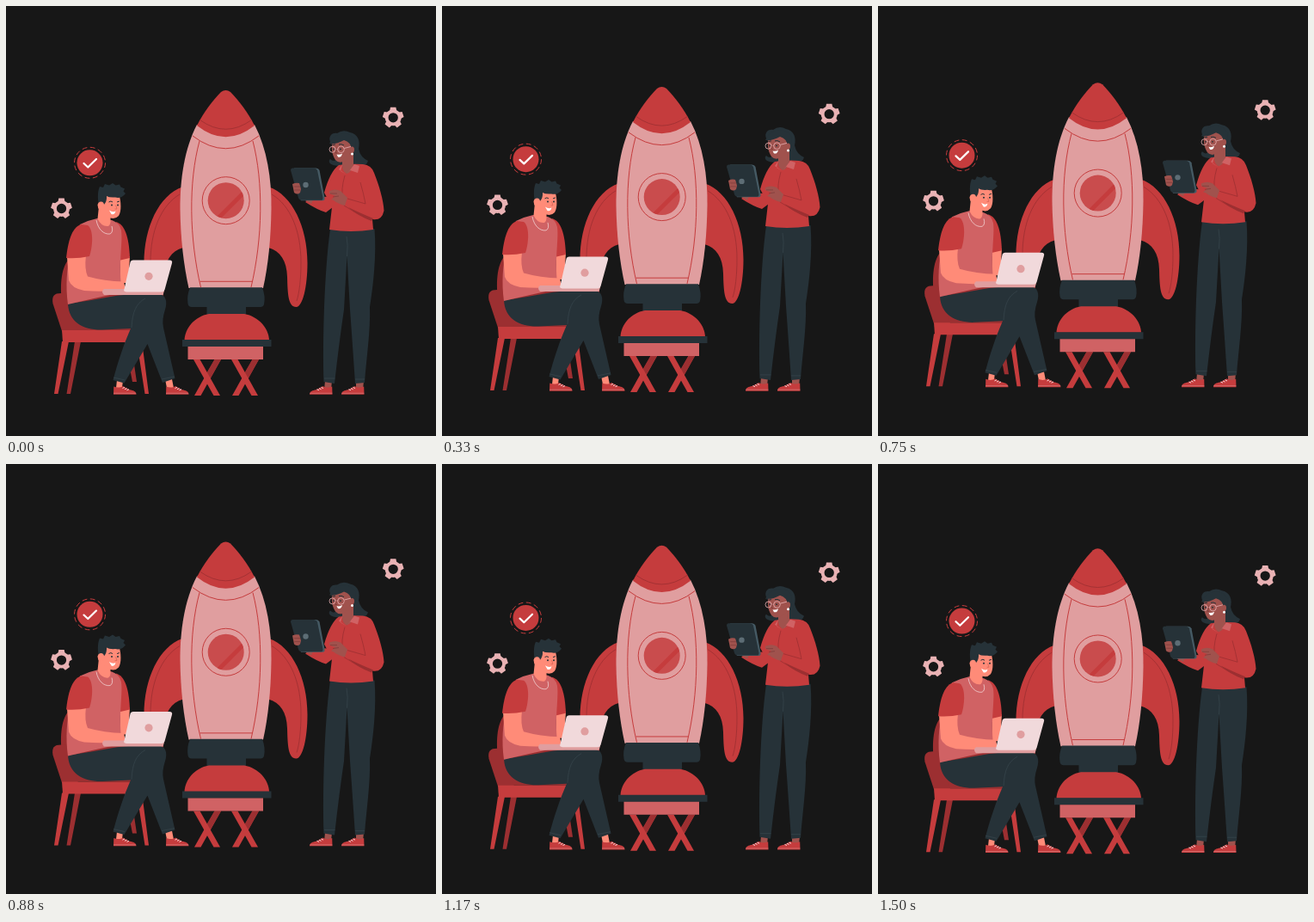
An HTML page that plays this animation: 500x500 px, repeating every 1.54 s.

```html
<!DOCTYPE html>
<html lang="en">
<head>
<meta charset="utf-8">
<title>Rocket team</title>
<style>
  html, body { margin: 0; width: 100%; height: 100%; overflow: hidden; background: #171717; }
  svg { display: block; width: 100%; height: 100%; }
  .red { fill: #c53c3d; }
  .deep { fill: #9c2f31; }
  .rose { fill: #d06264; }
  .pink { fill: #e09e9f; }
  .pale { fill: #f1d9db; }
  .gear { fill: #e9b2b4; }
  .dark { fill: #263238; }
  .skin { fill: #ff8b78; }
  .brown { fill: #a0524d; }
  .white { fill: #fff; }
  .line { fill: none; stroke: #c53c3d; stroke-width: 1; }
  .fold { fill: none; stroke: #9c2f31; stroke-width: .8; }
  .thin { fill: none; stroke: #fff; stroke-width: .8; }
</style>
</head>
<body>
<svg viewBox="0 0 500 500">
  <defs>
    <g id="fin">
      <path class="red" d="M306 210.500C333 220 350.500 257 350.500 299C350.500 326 345 350 337.500 350C328 350 327.500 334 327 315C326.500 296 319 285 305 281Z"/>
      <path class="fold" d="M309 219C331 232 343 262 343 298C343 318 341 334 338 343"/>
    </g>
    <g id="trestle">
      <path class="red" d="M242.500 411H250L226.500 453H219Z"/>
      <path class="deep" d="M242.500 411H250L238 432.500L232.500 428Z"/>
      <path class="red" d="M218 411H225.500L249 453H241.500Z"/>
    </g>
    <g id="shoe">
      <path class="red" d="M.3 1.500C4 3 8 3 11 1L19 5.200C23 6 26.500 7 26.500 10.800H0Z"/>
      <path class="thin" d="M0 9.300H26.300" stroke-opacity=".3"/>
      <path class="thin" d="M10.500 3.600L13 2.300M13 4.800L15.500 3.500M15.500 5.800L18 4.700"/>
    </g>
    <g id="gear">
      <circle r="7.600" fill="none" stroke="#e9b2b4" stroke-width="3.900"/>
      <g id="teeth" class="gear"></g>
    </g>
    <clipPath id="glass"><circle cx="255.700" cy="226.200" r="21"/></clipPath>
  </defs>

  <g id="scene">
    <!-- rocket -->
    <use href="#fin"/>
    <use href="#fin" transform="matrix(-1 0 0 1 511 0)"/>
    <path class="pink" d="M222 138C207.500 166 202.300 201 202.500 236C203 270 206.500 301 212.500 328H299C305 301 308 270 308.500 236C309 201 303.500 166 289 138Z"/>
    <path class="red" d="M222 139C230 123.500 240 110 250 100Q255.500 96 261 100C271 110 281 123.500 289 139Q255.500 165.500 222 139Z"/>
    <path class="fold" d="M225.500 132.500Q255.500 154 285.500 132.500"/>
    <path class="line" d="M217 151Q255.500 180.500 294 151M225 157C212 205 213 270 226.500 327M287 157C299.500 205 298.500 270 285 327M225.500 320.300H286.500"/>
    <circle class="line" cx="255.700" cy="226.200" r="27.500"/>
    <circle cx="255.700" cy="226.200" r="21" fill="#c94c4d"/>
    <path class="red" clip-path="url(#glass)" d="M242 248L280 210L283 214L246 251Z"/>
    <path class="dark" d="M214 327.300H298Q302 338 300 347Q299 350 296 350H216Q212 350 211.500 346Q210 337 214 327.300ZM233.500 349H279V359H233.500Z"/>
    <path class="red" d="M207.500 388.500C208 375 219 361 236 358H277C294 361 305.500 375 306 388.500Z"/>
    <path class="dark" d="M205 388H308.500V396H205Z"/>
    <use href="#trestle"/>
    <use href="#trestle" x="44"/>
    <path class="rose" d="M211.500 396H299V411H211.500Z"/>

    <!-- chair -->
    <path class="deep" d="M72 296C64 305 62 328 66 350L75 377H148V340L95 300ZM80 390H87L75 451H70.500ZM138 390H145L152 437H147Z"/>
    <path class="deep" d="M65 378L54.500 346C53 337 56 334 64 334H70L84 378Z"/>
    <path class="red" d="M65 377H160V391H66Z"/>
    <path class="red" d="M65 390H73L60.500 451H56ZM152 390H158L166 451H161.500Z"/>

    <!-- man: legs -->
    <path class="skin" d="M129 435H136L135 444H128ZM185 434H193L195 444H187Z"/>
    <path class="dark" d="M72 346C95 344 122 336 150 335H177C186 335 188 344 185 353Q181 365 183 374L196.500 433L182 438L164.500 393L137.500 438.500L124.500 435C130 414 137 393 145 375L112 376.500C90 377 73 368 72 346Z"/>
    <path d="M162 340C151 346 147 356 146 374M125 432L138 435M181 434L196 431" fill="none" stroke="#3c4a51" stroke-width=".6"/>
    <use href="#shoe" x="125" y="441"/>
    <use href="#shoe" x="186" y="441"/>

    <!-- man: body -->
    <path class="skin" d="M133 291H144L142 322H132Z"/>
    <path class="red" d="M128 251C138 254 143 268 144 293L131 296Z"/>
    <path class="rose" d="M86 254Q96 249 106 247L123 249Q132 252 134 261C136 278 130 300 135 333Q101 340 72 347C69 325 71 305 74 290Z"/>
    <path class="skin" d="M108 233L106.500 247.500Q111 257 119 256Q122 254 121.500 248V240Z"/>
    <path class="thin" d="M105 249C107 260 114 266 121 265Q125 263 123 256" stroke-opacity=".7"/>
    <path class="skin" d="M71 292L93 290Q91 306 95 314.500Q114 320 137 320.500L139 330Q117 333 91 331Q76 328 73 319Z"/>
    <path class="red" d="M87 254C76 258 72 275 70 293Q83 294 97 291C101 279 102 260 95 255Z"/>

    <!-- man: head -->
    <path class="skin" d="M113 217L131 218C134 227 134.500 239 131 244Q126 249.500 118 245L111 239Q107 237 106.500 231Z"/>
    <path class="dark" d="M108 231C106 222 107 214 109 210L113 211L115 207L120 208.500L124 206L127.500 208.500L132 207.500L133.500 210.500L138 212.500L136.500 215.500L139 218Q134 224.500 127 222.500Q120 223 117 221Q117.500 227 114 231Z"/>
    <ellipse class="skin" cx="110.500" cy="232" rx="3.600" ry="4.500"/>
    <path d="M119.500 228Q122 226 124 228M129 228L132 227" fill="none" stroke="#263238"/>
    <circle class="dark" cx="123" cy="231.500" r="1"/>
    <circle class="dark" cx="130" cy="231.500" r="1"/>
    <path d="M127.500 231.500L129 236L126.500 236" fill="none" stroke="#d96556" stroke-width=".8"/>
    <path class="white" d="M120 237.500Q124 240.500 127.500 238.500Q126 243.500 122.500 242Z"/>

    <!-- laptop -->
    <path class="pink" d="M114 329H140L184 331L182.500 336H114Q110 332 114 329Z"/>
    <path class="pale" d="M148 295.500H190Q194 295.500 193 299L184.500 330Q183.500 332.500 181 332.500H140Q136 332 137.500 329L144.500 298Q145 295.500 148 295.500Z"/>
    <circle class="pink" cx="166" cy="314.300" r="4.600"/>

    <!-- woman: legs -->
    <path class="brown" d="M371 436H379L378 446H370ZM407 436H416L415 446H407Z"/>
    <path class="dark" d="M377 259H428.500C431 290 427 325 423 350C424 378 419 410 417 438L406 439C404 410 402 380 400 353L396.500 291L393 353Q387.500 390 382 439L369.500 437C368 390 370 310 377 259Z"/>
    <path d="M396.500 291Q398 278 396 268M370 433H382.500M406 434H417" fill="none" stroke="#3c4a51" stroke-width=".6"/>
    <use href="#shoe" transform="matrix(-1 0 0 1 379.500 441)"/>
    <use href="#shoe" transform="matrix(-1 0 0 1 416.500 441)"/>

    <!-- woman: hair and body -->
    <path class="dark" d="M377 158C374 150 381 147 385 148Q392 143 400 147C410 149 412 158 410 166Q412 176 421 180Q419 187 410 186H390C376 186 374 181 377 178Q382 183 386 176Z"/>
    <path class="red" d="M378 198L374 222L357 221L348 228Q362 237 372 240L380 234Z"/>
    <path class="red" d="M387 185Q402 183 415 184Q425 185 428 194C434 209 439 226 439.500 238Q437 250 426 248L427 260Q401 264 376 260L379 234L370 217Q377 192 387 185Z"/>
    <path class="fold" d="M412 205Q416 219 418 230L397 224M393 232Q407 242 424 248M394 197Q389 215 392 222"/>
    <path class="deep" d="M398 234Q410 240 427 247L425 250Q409 244 398 234Z"/>
    <path class="brown" d="M391 176L404 169V184Q403 193 396 195Q391 192 391 186Z"/>
    <path class="rose" d="M391 184L387 190L396 196L405 184L411 186L409 194L400 191L396 196L389 192Z"/>

    <!-- woman: head -->
    <path class="brown" d="M380 157Q391 152 400 158L404 168Q402 176 396 179Q388 184.500 383 179C378.500 172 378 164 380 157Z"/>
    <path class="dark" d="M376 160Q380 151 388 149Q401 146 407 157L406 167H402Q401 158 393 156Q384 161 376 160Z"/>
    <path d="M379.500 161.500L383 161M387 161Q390 160 393 162" fill="none" stroke="#263238"/>
    <circle class="dark" cx="381" cy="166.500" r=".9"/>
    <circle class="dark" cx="389" cy="166.500" r=".9"/>
    <g fill="none" stroke="#e9b2b4" stroke-width=".8">
      <circle cx="379.500" cy="166.800" r="3.500"/><circle cx="389.500" cy="166.800" r="3.800"/>
      <path d="M383 166.300H385.700M393.300 165.500L401 163.500"/>
    </g>
    <path d="M384.500 165L383 171H385" fill="none" stroke="#7b3a38" stroke-width=".8"/>
    <path class="white" d="M384.500 172.500Q388 173.500 391 171.500Q390 176.500 386 175.500Z"/>
    <ellipse class="brown" cx="402.500" cy="167" rx="2.500" ry="3.500"/>
    <circle class="white" cx="402.500" cy="172" r="1.500"/>

    <!-- tablet and hands -->
    <path class="brown" d="M350 221L358 223L355 230L346 225Z"/>
    <path d="M335 188.500H360.500Q363.500 188.500 364.500 191L370.500 223Q371 226.300 368 226.300H343Z" fill="#455a64"/>
    <path class="dark" d="M333 188.500H358Q361 188.500 362 191L368.500 223Q368.500 225.800 366.500 225.800H344Q341 225.800 340 223L331 191Q331 188.500 333 188.500Z"/>
    <circle cx="348.500" cy="208" r="3.200" fill="#5d6d75"/>
    <path class="brown" d="M333 207Q337 205 341 206L342 209L343 213L342 217Q339 220 335 217Z"/>
    <path d="M335 210H342M335.500 214H342" stroke="#7b3a38" stroke-width=".7"/>
    <path class="brown" d="M376 215Q383 212 389 215L397 223L394 232Q386 230 381 226L378 225L383 221L376 218Z"/>
    <path d="M377 218L385 218M380 222L387 221" stroke="#7b3a38" stroke-width=".7"/>

    <!-- badge and gears -->
    <circle class="red" cx="97.500" cy="182.300" r="15"/>
    <circle class="line" cx="97.500" cy="182.300" r="18" stroke-dasharray="5.800 3.600"/>
    <path d="M90.500 183L95.300 187.500L105 178" fill="none" stroke="#fff" stroke-width="2.200" stroke-linecap="round" stroke-linejoin="round"/>
    <use href="#gear" x="64.500" y="235.500"/>
    <use href="#gear" x="450.200" y="129.800"/>
  </g>
</svg>
<script>
  const LOOP = 1540, LEAD = 45, RISE = 9.1;
  const scene = document.getElementById('scene');

  document.getElementById('teeth').innerHTML = [0, 72, 144, 216, 288]
    .map(a => `<path d="M-4 -8L-3.200 -12H3.200L4 -8Z" transform="rotate(${a})"/>`).join('');

  // Gentle float: halfway between a steady ramp and a cosine.
  function lift(phase) {
    const ramp = 1 - Math.abs(1 - 2 * phase);
    const wave = (1 - Math.cos(Math.PI * ramp)) / 2;
    return (ramp + wave) / 2;
  }

  const start = performance.now();
  function draw(now) {
    const phase = (Math.max(0, now - start) + LEAD) % LOOP / LOOP;
    const y = 0.3 - RISE * lift(phase);
    scene.setAttribute('transform', `translate(0 ${y.toFixed(3)})`);
    requestAnimationFrame(draw);
  }
  draw(start);
</script>
</body>
</html>
```
